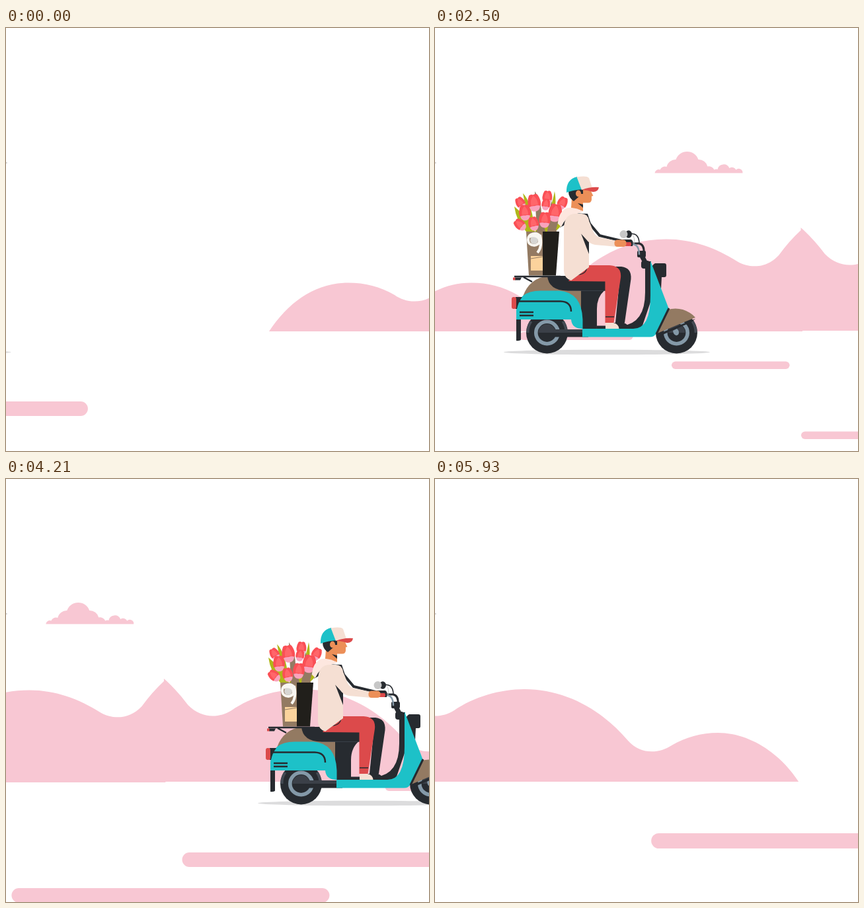
Write an HTML page that moves like this. It is 640x640 px and loops after 6 s.

```html
<!DOCTYPE html>
<html lang="en">
<head>
<meta charset="utf-8">
<title>Flower delivery</title>
<style>
html, body { margin: 0; width: 100%; height: 100%; overflow: hidden; background: #fff; }
svg { display: block; width: 100%; height: 100%; }
.pink { fill: #f8c7d3; }
.teal { fill: #1dc1c8; }
.dark { fill: #272b30; }
.soft { fill: #3b4048; }
.brown { fill: #937a62; }
.red { fill: #dc4a4b; }
.skin { fill: #ec8f58; }
.cream { fill: #f5dfd3; }
.leaf { fill: #afb71a; }
.line { fill: none; stroke: #272b30; stroke-width: 2.5; }
.steel { fill: none; stroke: #8499a8; }
</style>
</head>
<body>
<svg viewBox="0 0 640 640">
  <defs>
    <g id="wheel">
      <circle class="dark" r="31.5"/>
      <path d="M-29 0A29 29 0 0 1 -24 -17M29 0A29 29 0 0 0 24 -17" fill="none" stroke="#444a53" stroke-width="4"/>
      <circle class="steel" r="16.7" stroke-width="5.6"/>
      <path class="soft" d="M-13 0A13 13 0 0 1 13 0Z"/>
    </g>
    <g id="tulip">
      <path d="M-8 0Q-9 14 0 14Q9 14 8 0Z" fill="#f9a3bd"/>
      <path d="M-6 -10Q-3 -12 0 -10Q3 -12 6 -10Q11 -1 8.500 7Q4 5 0 6Q-4 5 -8.500 7Q-11 -1 -6 -10Z" fill="#fa4f55"/>
      <path d="M0 -9Q6 -3 5 5Q0 4 -5 5Q-6 -3 0 -9Z" fill="#ff666a"/>
    </g>
  </defs>

  <path id="hills" class="pink" d="M0 459C30 414 70 385.5 120 385.5C145 385.5 168 391 190 404C208 417 236 418 256 399C300 350 350 319.5 415 319.5C455 319.5 490 333 522 353C541 364 566 364 585 344Q601 322 618.500 306V302L623 306Q640 322 655 342C675 362 700 363 721 350C750 330 790 318 827 318C890 318 945 350 984 396C1003 417 1030 416 1050 403C1070 391 1095 384 1120 384C1165 384 1212 412 1242 458H621V459Z"/>
  <path id="cloud" class="pink" d="M-49 219.500A6 6 0 0 1 -41 214.500A8 8 0 0 1 -31 210A14 14 0 0 1 -17 199A18 18 0 0 1 17 199A14 14 0 0 1 31 209.500A9 9 0 0 1 41 214.500Q44 213 46 214A9.500 9.500 0 0 1 64 212A7 7 0 0 1 74 214.500A6 6 0 0 1 84 219.500Z"/>
  <g id="bars" class="pink"></g>
  <ellipse cx="0" cy="204" rx="2" ry="1" fill="#ccc"/>

  <g id="scooter">
    <ellipse cx="260" cy="490.500" rx="156" ry="3.800" fill="#dcdcdd"/>

    <!-- wheels -->
    <use href="#wheel" x="169.500" y="461"/>
    <use href="#wheel" x="365.500" y="461"/>
    <path class="soft" d="M160 456H224V461H160Z"/>
    <path class="dark" d="M160 461H232V467.500H160Z"/>
    <path d="M360 458L366 455Q371 459 368 464Q364 467 361 462Z" fill="#8499a8"/>
    <path class="dark" d="M335 464L394 440L388 445L340 466Z"/>
    <path class="brown" d="M352 426Q364 423 375 426Q387 430 394 438L335 462.500Z"/>
    <path class="dark" d="M123 441H130V472Q126 474 123 473Z"/>

    <!-- flowers and bag -->
    <g class="leaf">
      <path d="M133 250Q147 264 151 308H139Q139 275 133 250Z"/>
      <path d="M120 270Q138 284 148 308H138Q123 292 120 270Z"/>
      <path d="M181 247Q186 272 174 308H160Q175 280 181 247Z"/>
      <path d="M152 308L158 270L164 308ZM201 283Q192 300 182 308H170Q186 296 201 283Z"/>
    </g>
    <path class="brown" d="M151 247Q161 263 161 280L167 308H154ZM176 260L184 308H170ZM193 272L182 308H174Z"/>
    <g id="flowers"></g>
    <path class="brown" d="M138 308H163V374.500H142Z"/>
    <path d="M163 308H188L183 374.500H163Z" fill="#211f1b"/>
    <path d="M145 345H163V367H145Z" fill="#fbd39c"/>
    <path d="M145 349L163 346" fill="none" stroke="#937a62"/>
    <circle cx="150" cy="321" r="6" fill="#d7d6d3"/>
    <path d="M159 315C154 308 141 311 141 320C141 332 158 331 158 322C158 314 145 312 143 317M159 313Q163 331 155 340" fill="none" stroke="#f8f6f1" stroke-width="4"/>

    <!-- far leg -->
    <path class="dark" d="M270 361H282Q298 363 296.500 380L287 446H273L279 385Z"/>
    <path class="dark" d="M268 446H286Q293 449 295 455H268Z"/>

    <!-- front shield and handlebar -->
    <path class="dark" d="M333 356H347Q350 356 350 359V374Q350 377 347 377H343L342 396L328 366Q328 358 333 356Z"/>
    <path class="dark" d="M318 353H327V412L312 456H245V450.500H283Q318 447 318 400Z"/>
    <path class="teal" d="M326 352L353.500 424L335 462Q332 467.500 325 467.500H223V455H300Q326 455 326 405Z"/>
    <path class="line" d="M354 424L335 463" style="stroke-width:3"/>
    <path class="line" d="M312 343L321 360" style="stroke-width:7"/>
    <rect class="dark" x="312" y="352" width="13" height="12" rx="4"/>
    <rect class="dark" x="306" y="337" width="13" height="10" rx="2"/>
    <path class="line" d="M300 326H309Q317 328 316 340" style="stroke-width:3"/>
    <path class="line" d="M295 311.500Q309 310 309 326" style="stroke-width:1.500"/>
    <path d="M299 313Q303 318 301 326" fill="none" stroke="#c7c7c7"/>
    <path class="steel" d="M298 327Q309 327 309 343" stroke-width="2.500"/>
    <ellipse class="dark" cx="293" cy="312" rx="5" ry="5.700"/>
    <circle cx="285.500" cy="312" r="6" fill="#c7c7c7"/>
    <path class="dark" d="M284 320H297Q301 322 299 330H284Z"/>
    <path class="red" d="M288 324H296Q298 327 296 330H286Z"/>

    <!-- rear body and seat -->
    <path class="brown" d="M133 406Q143 378 172 375L223 396V441H133Z"/>
    <path class="dark" d="M221 396H258Q245 406 245 425V455H221Z"/>
    <path class="dark" d="M170 375H206L258 383V397.500H200Q172 397 170 375Z"/>
    <path d="M200 397.500H258" stroke="#444a53" stroke-width=".7"/>
    <path class="teal" d="M123 441V428Q124 398 160 397.500H188Q222 400 223.500 441V455Q207 455 206 441Z"/>
    <path class="line" d="M123 413.500H190Q206 414 206 429M128 430H149M128 435H149"/>
    <path class="dark" d="M122 407H132Q126 415 124 425H122Z"/>
    <rect class="red" x="116" y="407" width="7" height="18" rx="3"/>
    <path class="line" d="M120 376H190M134 377L147 384"/>
    <path class="dark" d="M121 377.500H131L129 381.500H121Z"/>
    <path class="red" d="M118 377.500H121.500V381.500H118Z"/>

    <!-- rider -->
    <path class="red" d="M202 383Q216 361 232 359H264Q283 360 281 378L270.500 446H257.500V383.500Z"/>
    <path class="line" d="M258 437H271M216 373Q229 373 230 361" style="stroke-width:1.300"/>
    <path class="cream" d="M258 446H270Q278 448 278.500 455H258Z"/>
    <path class="line" d="M228 289L249 314L286 323" style="stroke-width:4"/>
    <path class="dark" d="M189 302L204 280L231 281L236 296H200Z"/>
    <path class="skin" d="M207 258L224 264V277L206 272Z"/>
    <path class="dark" d="M216 265L224 267V272Z"/>
    <path d="M186 296Q187 277 201 272Q215 271 224 278L212 282Q197 286 191 301Z" fill="#fde7df"/>
    <path class="cream" d="M212 281Q195 282 195 304V368Q196 379 206 382L233 362V291Q231 281 222 281Z"/>
    <path class="dark" d="M221 311L233 317V342Z"/>
    <path class="cream" d="M222 282Q230 283 234 294L240 309Q243 315 250 317L275 322V331L242 328Q233 326 229 320L218 308Z"/>
    <rect class="skin" x="271.500" y="320.500" width="18" height="10.500" rx="4.500"/>
    <path class="skin" d="M211 245H236L237 249L239.500 254L237 254.500V260Q236 265 231 264.500H222L210 262Z"/>
    <path class="dark" d="M202 247Q202 257 210 262L218 255V251H224V242Z"/>
    <ellipse class="skin" cx="217" cy="250.500" rx="4" ry="5"/>
    <path class="teal" d="M199 249Q198 229 215 225L224 244Q209 245 199 249Z"/>
    <path class="cream" d="M214.500 225.500Q230 223 233 227L238 242L222 245Z"/>
    <path class="red" d="M222 245Q235 240 248 241Q247 248 239 248Q231 245 222 245Z"/>
  </g>
</svg>
<script>
const LOOP = 6000, STEP = LOOP / 84, BAR_SPEED = 1.617;
const $ = id => document.getElementById(id);

function add(parent, tag, attrs) {
  const el = document.createElementNS("http://www.w3.org/2000/svg", tag);
  for (const key in attrs) el.setAttribute(key, attrs[key]);
  return parent.appendChild(el);
}

// x, y, tilt, scale
[
  [129, 264, -30, .75], [193, 264, 25, .8], [170, 255, 3, .8],
  [168, 266, 8, .7], [150, 263, -8, 1.05], [182, 278, 8, 1.1],
  [136, 278, -5, .95], [128, 297, -50, .8], [149, 295, -12, .85],
  [166, 289, 3, .95]
].forEach(([x, y, tilt, size]) => add($("flowers"), "use", {
  href: "#tulip", transform: `translate(${x} ${y}) rotate(${tilt}) scale(${size})`
}));

// y, height, width, time at the left edge, period
const bars = [
  [446, 8, 150, 1749, 2350],
  [460, 12, 172, 2579, 1990],
  [504.5, 11.5, 178.5, 2721.4, 1992],
  [536, 23, 401, 3839.5, 2291.4],
  [565, 22, 560, 2054.7, 2324.4],
  [610.5, 11.5, 192, 2842.6, 1974.3],
  [619, 22, 481, 1844.5, 2375]
].map(([y, height, width, at, period]) => ({
  at, period, el: add($("bars"), "rect", { y, height, width, rx: height / 2 })
}));

const mod = (a, n) => ((a % n) + n) % n;
const moveX = (el, x) => el.setAttribute("transform", `translate(${x.toFixed(2)} 0)`);

// All three layers slow down very slightly over the loop.
function draw(t) {
  moveX($("hills"), 398 - .1862 * t + 4e-7 * t * t);
  moveX($("cloud"), 784.7 - .1628 * t + 6e-7 * t * t);
  moveX($("scooter"), -408.3 + .1643 * t - 4e-7 * t * t);
  for (const { el, at, period } of bars)
    moveX(el, BAR_SPEED * (mod(at - t + 750, period) - 750));
}

const start = performance.now();
function tick() {
  const t = (performance.now() - start) % LOOP;
  draw(Math.floor(t / STEP + .08) % 84 * STEP);
  requestAnimationFrame(tick);
}
tick();
</script>
</body>
</html>
```
